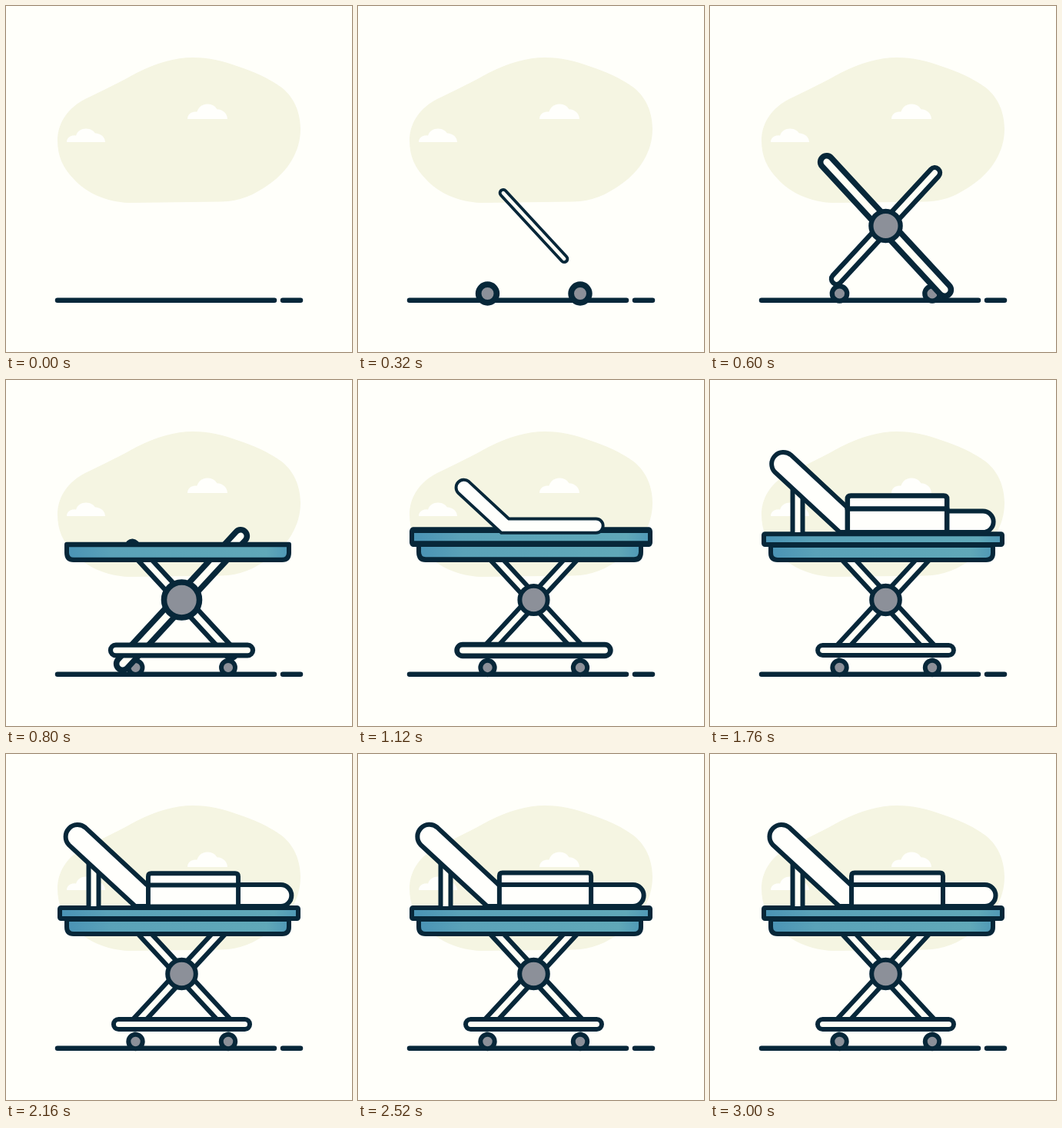
An HTML page for the animation above (3040 ms loop, 450 px wide and 450 px high).

```html
<!DOCTYPE html>
<html lang="en">
<head>
<meta charset="utf-8">
<title>Stretcher</title>
<style>
  html, body { margin: 0; width: 100%; height: 100%; overflow: hidden; background: #fffffa; }
  svg { display: block; width: 100vw; height: 100vh; }
  .line { stroke: #072739; stroke-width: 6; stroke-linecap: round; stroke-linejoin: round; }
  .white { fill: #fffffc; }
  .cream { fill: #fffff6; }
  .blue { fill: url(#steel); }
  .grey { fill: #8c9099; }
  .none { fill: none; }
  .bar { stroke: #072739; stroke-width: 19; stroke-linecap: round; }
  .core { stroke: #fffff6; stroke-width: 7; stroke-linecap: round; }
  #ground { stroke-width: 6.5; }
</style>
</head>
<body>
<svg viewBox="0 0 450 450">
  <defs>
    <linearGradient id="steel">
      <stop offset="0" stop-color="#4a93b5"/>
      <stop offset=".2" stop-color="#5aa2b8"/>
      <stop offset=".9" stop-color="#60a8b8"/>
      <stop offset="1" stop-color="#4f98b6"/>
    </linearGradient>
    <path id="cloud" class="white" d="M0 17.500C0 12 5 8 12 9C14 3 19 0 25 0C31 0 35 3 37 6C44 6 50 11 50 17.500Z"/>
  </defs>

  <path fill="#f5f5e2" d="M67 175C67 150 83 131 103 121C130 108 150 98 170 87C195 74 220 67 243 67C265 67 280 71 300 78C322 85 342 94 357 105C374 117 383 138 383 160C383 188 368 214 342 232C322 246 305 254 280 254.500L160 256C130 255 105 243 89 226C74 211 67 195 67 175Z"/>
  <use href="#cloud" x="79" y="159.500"/>
  <use href="#cloud" transform="translate(236 127.500) scale(1.04 1.12)"/>
  <path id="ground" class="line none" d="M67 382.800H349M360 382.800H383"/>

  <circle id="wheelL" class="line grey" cx="168.500" cy="374" r="9.200"/>
  <circle id="wheelR" class="line grey" cx="289" cy="374" r="9.200"/>

  <g id="legA">
    <path class="bar" d="M167.500 220L289.500 352"/>
    <path class="core" d="M167.500 220L289.500 352"/>
  </g>
  <g id="legB">
    <path class="bar" d="M289.500 220L167.500 352"/>
    <path class="core" d="M289.500 220L167.500 352"/>
  </g>
  <circle id="hub" class="line grey" cx="228.500" cy="286" r="18.300"/>
  <rect id="base" class="line cream" x="140" y="345" width="177" height="13" rx="6.500"/>

  <path id="tray" class="line blue" d="M79 215H368V225Q368 234 359 234H88Q79 234 79 225Z"/>
  <rect id="top" class="line blue" x="70" y="200" width="310" height="14" rx="1.500"/>

  <path id="props" class="line cream" d="M107.500 198V135H120.500V198"/>
  <path id="bed" class="line white" d="M103 95.500L183 170H357.500A14 14 0 0 1 357.500 198H168L81.500 118A15.600 15.600 0 0 1 103 95.500Z"/>
  <g id="blanket">
    <path class="line white" d="M184 198.500V158.500Q184 154.500 188 154.500H299Q303 154.500 303 158.500V198.500Z"/>
    <path class="line" d="M184 170H303"/>
  </g>
</svg>
<script>
  const LOOP = 3040, STEP = 40, LEAD = 10;
  const BEAT = 200;
  const SWING = 500, DECAY = 0.005, AMP = 0.76;
  const get = id => document.getElementById(id);

  // starting beat, pivot x, pivot y, vertical only
  const parts = {
    wheelL:  [0, 168.5, 374],
    wheelR:  [0, 289, 374],
    legA:    [1, 228.5, 286],
    legB:    [2, 228.5, 286],
    hub:     [2, 228.5, 286],
    tray:    [3, 225, 237, true],
    base:    [3, 228.5, 351.5],
    top:     [4, 225, 217, true],
    bed:     [5, 220.6, 200],
    blanket: [6, 243.5, 200],
    props:   [6, 114, 198, true]
  };

  // Grow steadily for one beat, then ring around full size.
  function pop(t) {
    if (t < BEAT) return Math.max(0, t / BEAT);
    const v = t - BEAT;
    return 1 + AMP * Math.sin(Math.PI * v / SWING) * Math.exp(-DECAY * v);
  }

  const items = Object.entries(parts).map(([id, spec]) => [get(id), ...spec]);

  function draw(t) {
    for (const [el, beat, x, y, vertical] of items) {
      const s = pop(t + LEAD - beat * BEAT);
      el.style.display = s > 0.05 ? '' : 'none';
      el.setAttribute('transform',
        `translate(${x} ${y}) scale(${vertical ? 1 : s} ${s}) translate(${-x} ${-y})`);
    }
  }

  const origin = performance.now();
  function tick() {
    const t = (performance.now() - origin) % LOOP;
    draw(Math.floor(t / STEP) * STEP);
    requestAnimationFrame(tick);
  }
  draw(0);
  requestAnimationFrame(tick);
</script>
</body>
</html>
```
